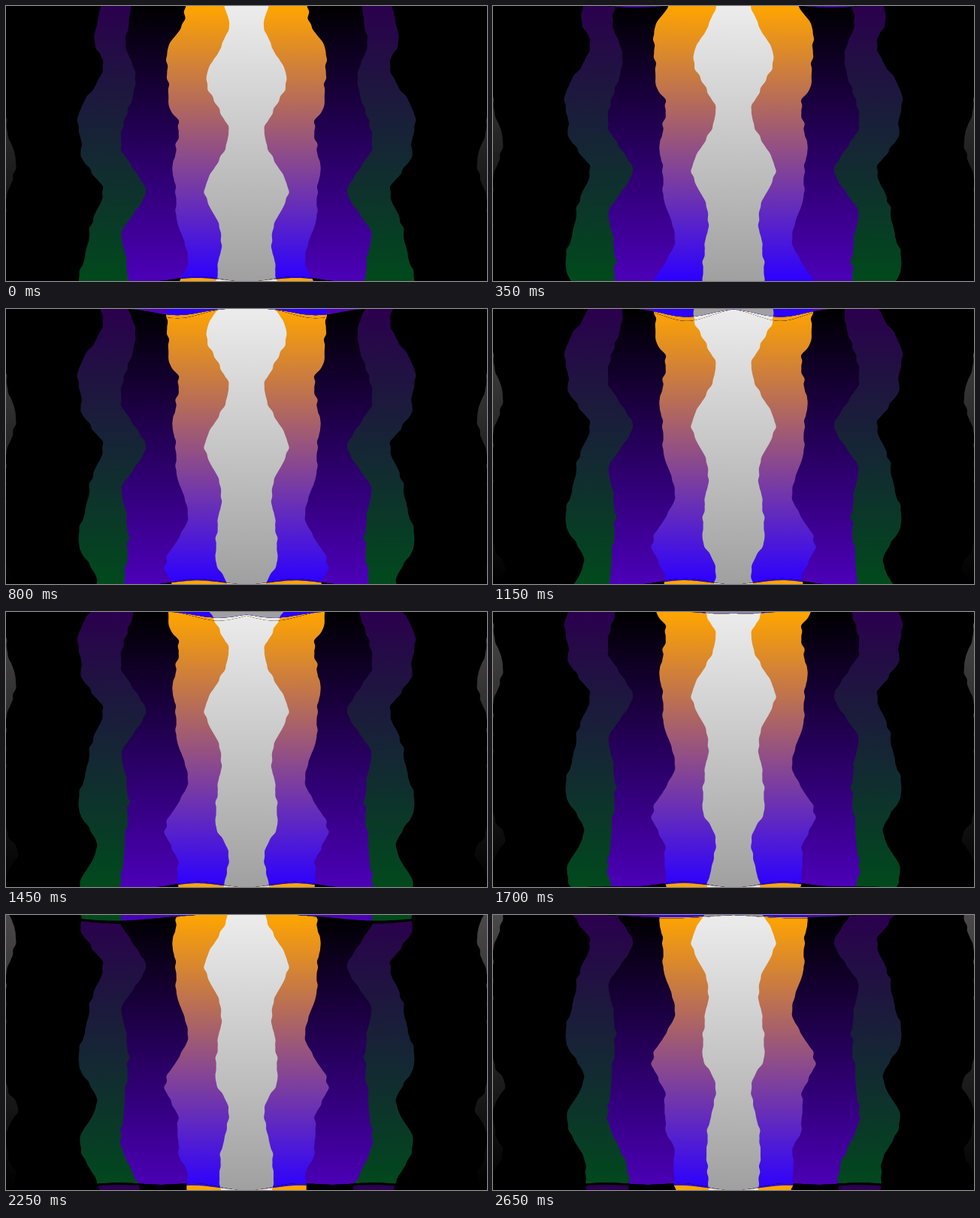
An HTML page with a canvas for the animation above (2700 ms loop, 640 px wide and 366 px high).

```html
<!DOCTYPE html>
<html lang="en">
<head>
<meta charset="utf-8">
<title>Rippling columns</title>
<style>
  html, body { margin: 0; width: 100%; height: 100%; overflow: hidden; background: #000; }
  canvas { display: block; width: 640px; height: 366px; }
</style>
</head>
<body>
<canvas id="stage" width="640" height="366"></canvas>
<script>
const W = 640, H = 366, LOOP = 2700, TICK = 50;
const SPEED = 0.0792; // upward drift of the ripples, px per ms
const ctx = document.getElementById('stage').getContext('2d');

const mix = (a, b, k) => a + (b - a) * k;
const clamp = (v, lo, hi) => Math.min(hi, Math.max(lo, v));
const smooth = k => k * k * (3 - 2 * k);
const bump = (v, center, width, height) => height * Math.exp(-(((v - center) / width) ** 2));

// Mirrored columns from the outside in; turns are the [drift position, x]
// extremes of the left edge, which swings smoothly from one to the next.
const columns = [
  { top: 'rgb(43,0,78)', bottom: 'rgb(0,74,28)',
    turns: [[0, 125], [42, 117], [82, 129], [150, 95], [195, 100], [248, 129],
            [300, 112], [372, 96], [428, 121], [480, 98], [546, 124]] },
  { top: 'rgb(0,0,0)', bottom: 'rgb(76,0,184)',
    turns: [[0, 166], [48, 160], [96, 173], [180, 152], [248, 185],
            [302, 155], [360, 163], [480, 153], [555, 180]] },
  { top: 'rgb(255,165,0)', bottom: 'rgb(44,0,255)',
    turns: [[16, 238], [60, 214], [132, 216], [158, 230], [212, 223], [280, 227],
            [336, 242], [406, 212], [450, 229], [490, 229], [530, 242]] },
  { top: 'rgb(236,236,236)', bottom: 'rgb(160,160,160)',
    turns: [[0, 292], [20, 297], [100, 268], [170, 296], [248, 265],
            [306, 287], [390, 278], [442, 296], [510, 284], [570, 287]] }
];
const rim = { top: 'rgb(74,72,72)', bottom: '#000' };

function fade({ top, bottom }) {
  const g = ctx.createLinearGradient(0, 0, 0, H);
  g.addColorStop(0, top);
  g.addColorStop(1, bottom);
  return g;
}
rim.fill = rim.gap = fade(rim);
columns.forEach((c, i) => {
  c.fill = fade(c);
  c.gap = i < 2 ? '#000' : c.fill; // the dark columns end in a black seam
});

// Seeded value noise between -1 and 1.
function hash(n) {
  const s = Math.sin(n * 127.1) * 43758.5453;
  return (s - Math.floor(s)) * 2 - 1;
}
function noise(pos, seed) {
  const i = Math.floor(pos);
  return mix(hash(i + seed * 57), hash(i + 1 + seed * 57), smooth(pos - i));
}

function edgeX(index, u) {
  const turns = columns[index].turns;
  let i = turns.length - 2;
  while (i > 0 && turns[i][0] > u) i--;
  const [u0, x0] = turns[i], [u1, x1] = turns[i + 1];
  const k = clamp((u - u0) / (u1 - u0), 0, 1);
  return mix(x0, x1, smooth(k)) + 1.8 * noise(u / 8, index + 1);
}

function rimX(u) {
  const x = bump(u, 210, 32, 15) + bump(u, 437, 22, 16) + bump(u, 525, 24, 14);
  return Math.max(0, x - 1 + 2 * noise(u / 8, 9));
}

function fillBetween(left, right) {
  ctx.beginPath();
  for (let y = 0; y <= H; y += 2) ctx.lineTo(left(y), y);
  for (let y = H; y >= 0; y -= 2) ctx.lineTo(right(y), y);
  ctx.fill();
}

function paint(offset, style) {
  ctx.fillStyle = '#000';
  ctx.fillRect(0, 0, W, H);
  ctx.fillStyle = rim[style];
  fillBetween(() => 0, y => rimX(y + offset));
  fillBetween(y => W - rimX(y + offset), () => W);
  columns.forEach((column, i) => {
    const x = y => edgeX(i, y + offset);
    ctx.fillStyle = column[style];
    fillBetween(x, y => W - x(y));
  });
}

// Depth of the wrapped strip at the top: two swells that travel inwards.
function topDepth(x, t) {
  const first = clamp(t / 1800, 0, 1), second = clamp((t - 1650) / 1200, 0, 1);
  return bump(x, 160 + 0.085 * t, 45, 12 * Math.sin(Math.PI * first ** 1.5))
       + bump(x, 120 + 200 * second ** 3, 80, 9 * Math.sin(Math.PI * second)) - 1.5;
}

// At the bottom one swell ebbs early on and a wider one rises later.
function bottomDepth(x, t) {
  const late = smooth(clamp((t - 1500) / 700, 0, 1));
  return bump(x, 255, 42, 7 - bump(t, 350, 250, 7)) + bump(x, 150, 75, 9 * late) - 1.5;
}

function paintStrip(depth, scale, atTop, offset, style) {
  const base = atTop ? 0 : H, inward = atTop ? 1 : -1;
  ctx.save();
  ctx.beginPath();
  ctx.moveTo(0, base);
  for (let x = 0; x <= W; x += 4) {
    ctx.lineTo(x, base + inward * scale * Math.max(0, depth(Math.min(x, W - x))));
  }
  ctx.lineTo(W, base);
  ctx.clip();
  paint(offset, style);
  ctx.restore();
}

const start = performance.now();

function frame() {
  const elapsed = (performance.now() - start) % LOOP;
  const t = Math.floor(elapsed / TICK) * TICK;
  const offset = t * SPEED;
  const top = x => topDepth(x, t), bottom = x => bottomDepth(x, t);
  paint(offset, 'fill');
  paintStrip(top, 1.5, true, offset, 'gap');
  paintStrip(bottom, 1.3, false, offset, 'gap');
  paintStrip(top, 1, true, offset, 'bottom');
  paintStrip(bottom, 0.9, false, offset, 'top');
  requestAnimationFrame(frame);
}
frame();
</script>
</body>
</html>
```
